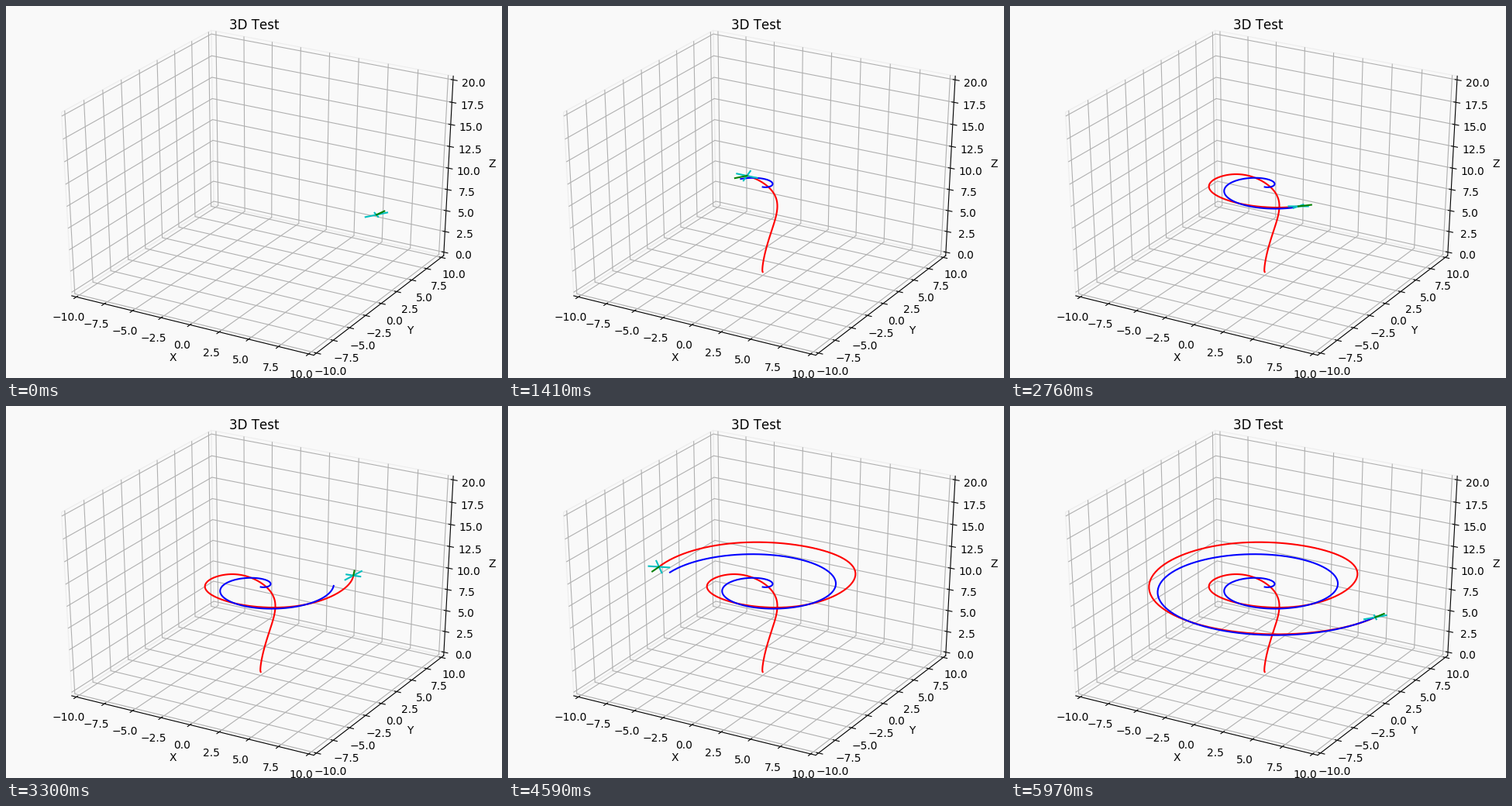
Recreate the animation shown at these times as a matplotlib script. Size 640 by 480 pixels, loop 6 s.

```python
import numpy as np
import matplotlib.pyplot as plt
from matplotlib.animation import FuncAnimation

W, H, N = 640, 480, 200
BACK = "#f9f9f9"
CENTER = np.array([0, 0, 10])

# Camera basis for elevation 30, azimuth -60
s3 = np.sqrt(3) / 2
RIGHT = np.array([s3, 0.5, 0])
UP = np.array([-0.25, s3 / 2, s3])
TOWARD = np.array([s3 / 2, -0.75, 0.5])


def project(p):
    """Data coordinates (..., 3) to stage pixels (..., 2)."""
    q = (np.asarray(p, float) - CENTER) / 20
    depth = 10 - q @ TOWARD
    x = (q @ RIGHT / depth + 0.095) / 0.185 * W
    y = H - (q @ UP / depth + 0.095) / 0.185 * H
    return np.stack([x, y], -1)


plt.rcParams["font.family"] = "DejaVu Sans"
plt.rcParams["text.kerning_factor"] = 6
fig = plt.figure(figsize=(W / 100, H / 100), dpi=100, facecolor=BACK)
ax = fig.add_axes([0, 0, 1, 1])
ax.set(xlim=(0, W), ylim=(H, 0))
ax.axis("off")


def path(points, color, lw, cap="projecting"):
    xy = project(points)
    ax.plot(xy[:, 0], xy[:, 1], color=color, lw=lw, solid_capstyle=cap, zorder=1)


def label(p, text, va):
    x, y = project(p)
    ax.text(x, y, text, ha="center", va=va, size=10, color="black")


# ---- box, grid, ticks ----
DELTA = 20 / 12
PAD = DELTA / 4
LO = np.array([-10, -10, 0]) - PAD
HI = np.array([10, 10, 20]) + PAD
PER_POINT = 48 / (72 * (W + H) / 100)
TICK_GAP = 11.5 * PER_POINT * DELTA
NAME_GAP = 25 * PER_POINT * DELTA
BACKSIDE = np.array([LO[0], HI[1], LO[2]])


def pane(axis):
    u, v = [k for k in range(3) if k != axis]
    corners = []
    for a, b in ((LO, LO), (LO, HI), (HI, HI), (HI, LO), (LO, LO)):
        c = BACKSIDE.copy()
        c[u], c[v] = a[u], b[v]
        corners.append(c)
    path(corners, "#ededed", 0.8)


def swap(p, axis):
    q = p.copy()
    q[axis] = LO[axis] + HI[axis] - q[axis]
    return q


def outward(p, axis, gap):
    q = p + np.where(p < CENTER, -gap, gap)
    q[axis] = p[axis]
    return q


def draw_axis(axis, edge, tick_dir, name):
    ends = np.array([edge, edge])
    ends[:, axis] = LO[axis], HI[axis]
    path(ends, "black", 0.8)
    label(outward(ends.mean(0), axis, NAME_GAP), name, "center")

    values = np.linspace(LO[axis] + PAD, HI[axis] - PAD, 9)
    for v in values:
        c = BACKSIDE.copy()
        c[axis] = v
        path([swap(c, (axis + 1) % 3), c, swap(c, (axis + 2) % 3)],
             "#b0b0b0", 0.8, "butt")
    for v in values:
        p = np.array(edge, float)
        p[axis] = v
        side = np.sign(p[tick_dir] - CENTER[tick_dir])
        step = np.eye(3)[tick_dir] * side * DELTA
        path([p + 0.2 * step, p - 0.1 * step], "black", 0.8)
        text = f"{v:.1f}".replace("-", "\u2212")
        label(outward(p, axis, TICK_GAP), text, "top")


for k in range(3):
    pane(k)
draw_axis(0, [LO[0], LO[1], LO[2]], 1, "X")
draw_axis(1, [HI[0], LO[1], LO[2]], 0, "Y")
draw_axis(2, [HI[0], HI[1], LO[2]], 0, "Z")
ax.text(W / 2, 0.08 * H - 6 * 100 / 72, "3D Test", ha="center",
        va="baseline", size=12, color="black")

# ---- desired path: a flat spiral at height 10 ----
step = np.arange(N)
theta = 4 * np.pi * step / N
radius = 10 * step / N
goal = np.stack([radius * np.cos(theta), radius * np.sin(theta),
                 np.full(N, 10.0)], -1)
goal_px = project(goal)


def smooth(keys, every):
    """Smooth curve over all steps through evenly spaced key values."""
    at = np.arange(len(keys)) * every
    bend = np.diff(np.eye(N), 3, axis=0)
    system = 50 * bend.T @ bend
    system[at, at] += 1
    rhs = np.zeros(N)
    rhs[at] = keys
    return np.linalg.solve(system, rhs)


# ---- flown path: a damped climb to the spiral plus a swaying overshoot ----
drop = project([0, 0, 0])[1] - project(CENTER)[1]
climb = drop * (1 + 0.095 * step) * np.exp(-0.095 * step)
sway_x = smooth([0, -2.2, 10.2, 9.8, -3.2, -24.2, -6.8, 17, 24.5, 3.5,
                 -11.8, -13.7, -6, 1.6, 3], 14)
sway_y = smooth([0, -2.3, -2.2, -8.9, -15.7, -11.3, -2.4, -5, -15.2, -17.3,
                 -13.4, -6.1, -1.5, -1.1, -0.9], 14)
flown_px = goal_px + np.stack([sway_x, climb + sway_y], -1)

# ---- craft: crossed arms banking inward, and a heading line ----
heading = theta + np.arctan(theta)
bank = 0.4 * np.minimum(1, step / 90)
PITCH = 0.08


def offset(i, turn, length):
    """Pixel offset of a body point around the craft."""
    angle = heading[i] + turn
    lift = bank[i] * np.cos(angle - theta[i]) - PITCH * np.cos(turn)
    d = length * np.array([np.cos(angle), np.sin(angle), lift])
    return project(goal[i] + d) - goal_px[i]


def line(color, z):
    return ax.plot([], [], color=color, lw=1.5, zorder=z)[0]


red, blue = line("red", 3), line("blue", 4)
arms = [line("c", 5), line("c", 5)]
nose = line("g", 6)


def update(n):
    red.set_data(*flown_px[:n].T)
    blue.set_data(*goal_px[:n].T)
    i = (n - 1) % N
    p = flown_px[i]
    for arm, turn in zip(arms, (np.pi / 4, -np.pi / 4)):
        d = offset(i, turn, 0.8)
        arm.set_data(*np.array([p - d, p + d]).T)
    nose.set_data(*np.array([p, p + offset(i, 0, 1.0)]).T)
    return [red, blue, *arms, nose]


anim = FuncAnimation(fig, update, frames=N, interval=30, repeat=True,
                     repeat_delay=0, blit=False)
plt.show()
```
